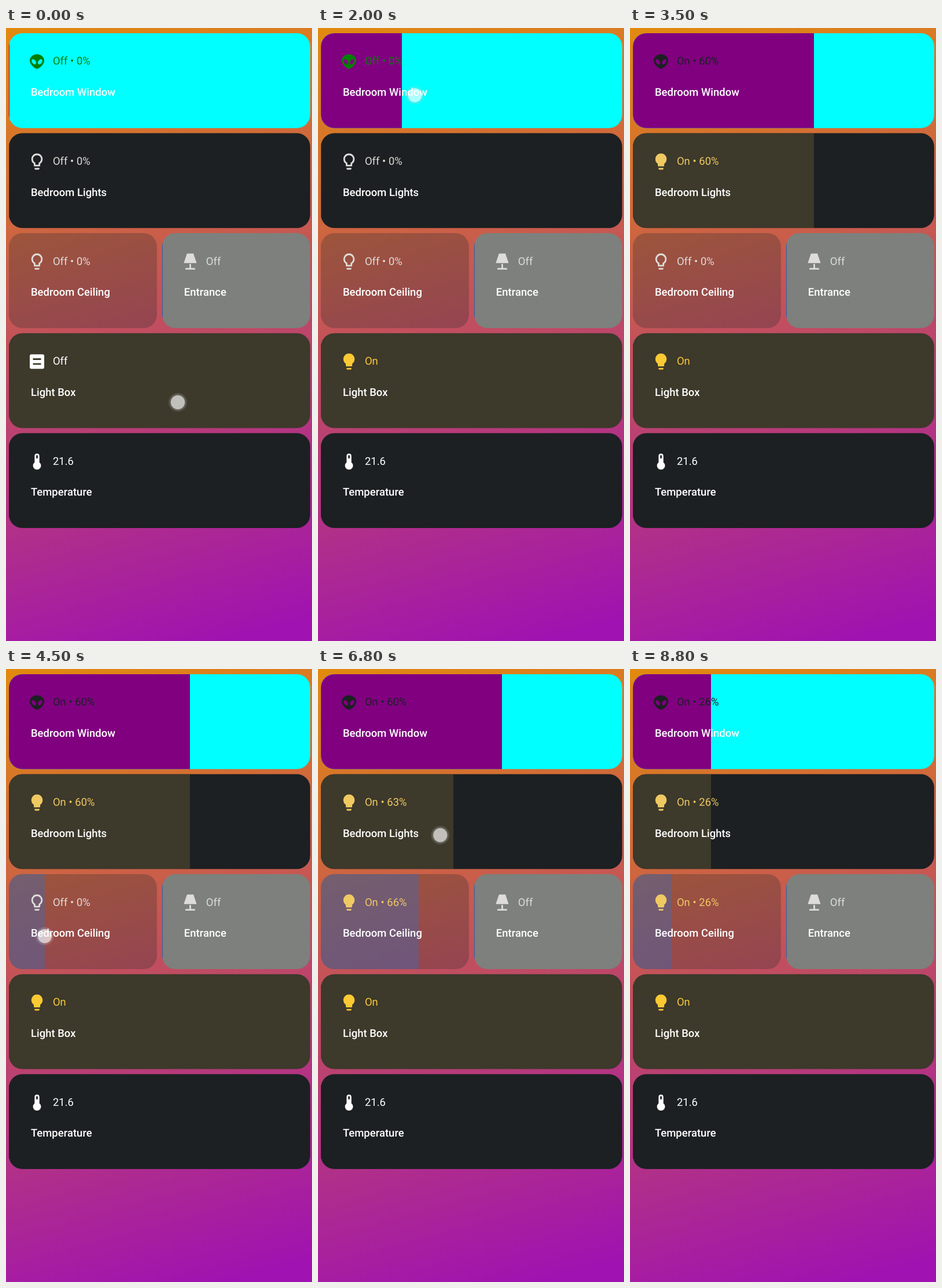
An HTML page for the animation above (8.9 s loop, 529x1058 px).

```html
<!DOCTYPE html>
<html lang="en">
<head>
<meta charset="utf-8">
<title>Light cards</title>
<style>
  html, body { margin: 0; width: 100%; height: 100%; overflow: hidden; }
  body { background: linear-gradient(165deg, #e28a0e, #a012b1 97%); }
  svg { display: block; width: 529px; height: 1058px; }
  text { font: 18.5px Roboto, sans-serif; text-rendering: geometricPrecision; }
  .name { font-weight: 500; fill: #fff; }
</style>
</head>
<body>
<svg id="stage" viewBox="0 0 529 1058">
  <defs>
    <radialGradient id="glow">
      <stop offset=".68" stop-color="#fff" stop-opacity=".68"/>
      <stop offset=".74" stop-color="#ccc" stop-opacity=".32"/>
      <stop offset="1" stop-color="#ccc" stop-opacity="0"/>
    </radialGradient>
  </defs>
</svg>
<script>
const LOOP = 8900;
const LEFT = 5.1, WIDE = 520.7, HALF = 255.8, HEIGHT = 163.8, PITCH = 172.6;
const DARK = '#1c2022', WARM = '#3d392b', PALE = '#dedcda', WHITE = '#fff';
const stage = document.getElementById('stage');

const bulb = 'M8 14.7A7 7 0 1 1 16 14.7V17A1 1 0 0 1 15 18H9A1 1 0 0 1 8 17Z' +
  'M9 20H15V21A1 1 0 0 1 14 22H10A1 1 0 0 1 9 21Z';
const icons = {
  bulb,
  outline: bulb + 'M10 13.6A5 5 0 1 1 14 13.6V16H10Z',
  alien: 'M12 3C17 3 21 6.6 21 11S15 21 12 21 3 15.4 3 11 7 3 12 3Z' +
    'M6.2 9.3A2.2 3.5 -32 0 1 10 15.3A2.2 3.5 -32 0 1 6.2 9.3Z' +
    'M17.8 9.3A2.2 3.5 32 0 1 14 15.3A2.2 3.5 32 0 1 17.8 9.3Z',
  lamp: 'M8 2H16L20 14H4ZM11 15H13V20H18V22H6V20H11Z',
  box: 'M5 3H19A2 2 0 0 1 21 5V19A2 2 0 0 1 19 21H5A2 2 0 0 1 3 19V5A2 2 0 0 1 5 3M7 8V10H17V8ZM7 14V16H17V14Z',
  thermometer: 'M15 13V5A3 3 0 0 0 9 5V13A5 5 0 1 0 15 13M12 4A1 1 0 0 1 13 5V8H11V5A1 1 0 0 1 12 4Z'
};

function set(el, attrs) {
  for (const key in attrs) el.setAttribute(key, attrs[key]);
}
function add(parent, tag, attrs) {
  const el = document.createElementNS('http://www.w3.org/2000/svg', tag);
  set(el, attrs);
  parent.append(el);
  return el;
}

// Builds one card and returns the function that updates it.
function card(name, row, back, front, x = LEFT, width = WIDE) {
  const g = add(stage, 'g', { transform: `translate(${x} ${8.9 + row * PITCH})` });
  const shape = { width, height: HEIGHT, rx: 23 };
  const id = name.replace(' ', '-');
  add(add(g, 'clipPath', { id }), 'rect', shape);
  add(g, 'rect', { ...shape, fill: back });
  const fill = add(add(g, 'g', { 'clip-path': `url(#${id})` }), 'rect',
    { height: HEIGHT, fill: front, 'shape-rendering': 'crispEdges' });
  const icon = add(g, 'path', { transform: 'translate(31.8 32.3) scale(1.39)', 'fill-rule': 'evenodd' });
  const state = add(g, 'text', { x: 75.8, y: 54.5 });
  add(g, 'text', { x: 37.8, y: 108.1, class: 'name' }).textContent = name;
  return (percent, label, shapeName, color) => {
    set(fill, { width: Math.max(1, width * percent / 100) });
    set(icon, { d: icons[shapeName], fill: color });
    set(state, { fill: color });
    if (state.textContent !== label) state.textContent = label;
  };
}

const bedWindow = card('Bedroom Window', 0, '#0ff', '#800080');
const lights = card('Bedroom Lights', 1, DARK, WARM);
const ceiling = card('Bedroom Ceiling', 2, 'rgba(51,51,51,.31)', 'rgba(56,107,186,.4)', LEFT, HALF);
const entrance = card('Entrance', 2, '#7d807c', '#2a62a8', LEFT + WIDE - HALF, HALF);
const lightBox = card('Light Box', 3, WARM, WARM);
const temperature = card('Temperature', 4, DARK, DARK);
const finger = add(stage, 'circle', { r: 17, fill: 'url(#glow)' });

entrance(0, 'Off', 'lamp', PALE);
temperature(0, '21.6', 'thermometer', WHITE);

const clamp = v => Math.min(1, Math.max(0, v));
const mix = (a, b, p) => a + (b - a) * p;
const smooth = p => p * p * (3 - 2 * p);

// A gesture eases the finger from one point to another, then fades it out.
// The slider under it follows with a short lag.
function gesture(start, time, from, to, lag = 0, width = WIDE) {
  const progress = t => smooth(clamp((t - start) / time));
  const x = t => mix(from.x, to.x, progress(t));
  return {
    start,
    x,
    y: t => mix(from.y, to.y, progress(t)),
    opacity: t => clamp((t - start + 100) / 100) * clamp((start + time + 320 - t) / 250),
    percent: t => (x(t - lag) - LEFT) / width * 100
  };
}
const at = (x, y) => ({ x, y });
const tap = gesture(-100, 100, at(297, 646), at(297, 646));
const openWindow = gesture(1605, 850, at(45, 108), at(317.6, 126), 48);
const raiseCeiling = gesture(4305, 680, at(40, 462), at(174, 457), 0, HALF);
const dimLights = gesture(6330, 800, at(333, 288), at(140.4, 286), 64);
const gestures = [tap, openWindow, raiseCeiling, dimLights];

function showLight(show, fill, value) {
  show(fill, level(value), value ? 'bulb' : 'outline', value ? '#efc962' : PALE);
}
const level = value => value ? `On • ${value}%` : 'Off • 0%';

function draw(t) {
  // Reported values arrive some time after each gesture.
  const boxOn = t >= 600, windowOn = t >= 3100, ceilingOn = t >= 5200, dimmed = t >= 7700;
  const windowValue = dimmed ? 26 : windowOn ? 60 : 0;
  const ceilingValue = dimmed ? 26 : ceilingOn ? 66 : 0;
  const lightsValue = ceilingOn && !dimmed ? 63 : windowValue;
  const slide = (drag, value) => t >= drag.start && !dimmed ? drag.percent(t) : value;

  bedWindow(slide(openWindow, windowValue), level(windowValue), 'alien', windowOn ? DARK : '#008000');
  showLight(lights, slide(dimLights, lightsValue), lightsValue);
  showLight(ceiling, slide(raiseCeiling, ceilingValue), ceilingValue);
  lightBox(0, boxOn ? 'On' : 'Off', boxOn ? 'bulb' : 'box', boxOn ? '#fbc934' : WHITE);

  const active = gestures.find(g => g.opacity(t) > 0) || tap;
  set(finger, { cx: active.x(t), cy: active.y(t), opacity: active.opacity(t) });
}

const begin = performance.now();
function tick() {
  draw((performance.now() - begin) % LOOP);
  requestAnimationFrame(tick);
}
tick();
</script>
</body>
</html>
```
